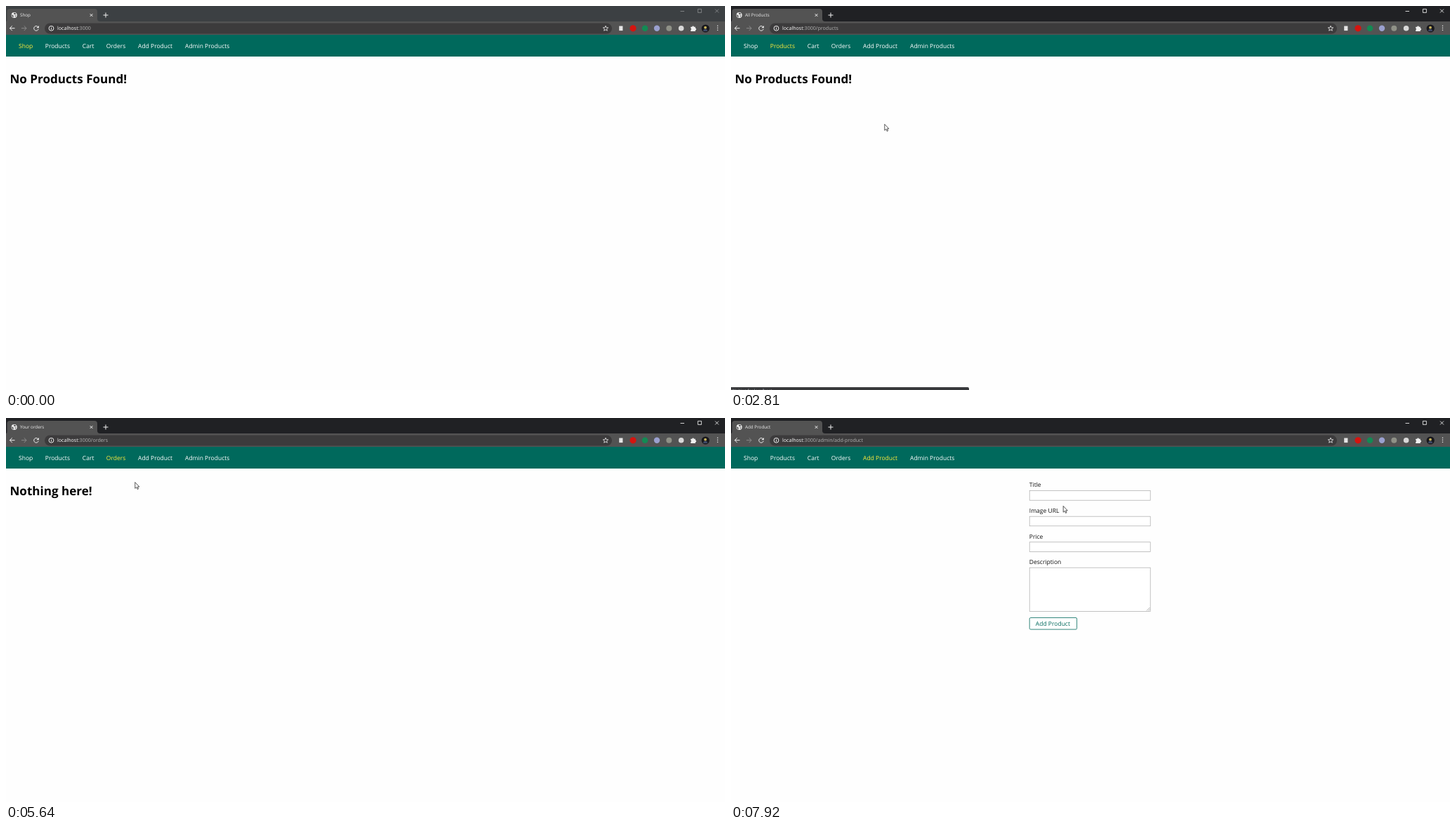
These frames come from a looping animation (1024x547 px, 8000 ms). An HTML page:

```html
<!DOCTYPE html>
<html lang="en">
<head>
<meta charset="utf-8">
<title>Shop</title>
<style>
  html, body { margin: 0; width: 100%; height: 100%; overflow: hidden; background: #fefefe; }
  svg { display: block; width: 100vw; height: 100vh; }
  text { font: 8.53px "Open Sans", sans-serif; text-rendering: geometricPrecision; white-space: pre; }
  .small { font-size: 6.3px; fill: #eee; }
  .url { font-size: 7.1px; fill: #b4b4b4; }
  .status { font-size: 6px; fill: #bdc1c6; }
  h1, .heading { font-size: 17.07px; font-weight: 700; }
  .line { fill: none; stroke: #f1f1f1; stroke-width: 1; }
  .field { fill: #fff; stroke: #a9a9a9; stroke-width: .7; }
</style>
</head>
<body>
<svg viewBox="0 0 1024 547" preserveAspectRatio="none">
  <rect width="1024" height="547" fill="#fefefe"/>

  <!-- Window frame and tab -->
  <rect id="titlebar" width="1024" height="23"/>
  <path d="M0 22 Q1.5 22 1.5 19 V8 Q1.5 4 5.5 4 H126 Q130 4 130 8 V18 Q130 22 134 22 H1024 V41 H0Z" fill="#535353"/>
  <g id="globe">
    <circle cx="11.7" cy="13" r="4" fill="#f1f1f1"/>
    <path d="M8.4 12 L10.6 13.4 V16.4 Q8 15.5 8.4 12 M11.2 9.6 L14.5 10.8 L13.5 12.2 L11 11.6Z M12.4 13.4 L14.6 13.6 L13.2 15.8Z" fill="#535353"/>
  </g>
  <path id="spinner" class="line" d="M8.2 13 A3.5 3.5 0 0 1 11.7 9.5"/>
  <text id="tabTitle" class="small" x="20" y="15.2"/>
  <path class="line" d="M119.7 11.2 l3.7 3.7 m0 -3.7 l-3.7 3.7"/>
  <path class="line" d="M138.5 13 h7 m-3.5 -3.5 v7"/>
  <path id="controls" fill="none" stroke-width=".8" d="M960.5 7.5 h5.5 M985.4 4.4 h5 v5 h-5Z M1010 4.5 l5 5 m0 -5 l-5 5"/>

  <!-- Toolbar -->
  <path class="line" d="M12.5 31.7 H5.5 M8.8 28.3 L5.4 31.7 L8.8 35.1"/>
  <path class="line" style="stroke:#8b8b8b" d="M22 31.7 h7 M25.7 28.3 L29.1 31.7 L25.7 35.1"/>
  <g id="reload">
    <path class="line" d="M45.7 29.9 A3.3 3.3 0 1 0 46.2 32.8"/>
    <path d="M46.8 28 V31.3 H43.4Z" fill="#f1f1f1"/>
  </g>
  <path id="stop" class="line" d="M40.2 29 l5.6 5.6 m0 -5.6 l-5.6 5.6"/>
  <rect x="55" y="24.5" width="808" height="15" rx="7.5" fill="#3c3b3c"/>
  <circle class="line" cx="64.5" cy="31.8" r="3.4" stroke-width=".8"/>
  <path class="line" d="M64.5 31.2 v2.4 M64.5 29.6 v.8"/>
  <text class="url" x="73" y="34.2"><tspan fill="#fff">localhost</tspan>:3000<tspan id="path"></tspan></text>
  <path class="line" stroke-width=".8" style="stroke-width:.8" d="M854 28.2 l1 2.5 2.7 .2 -2.1 1.7 .7 2.6 -2.3 -1.4 -2.3 1.4 .7 -2.6 -2.1 -1.7 2.7 -.2Z"/>
  <g id="extensions"></g>
  <path d="M975.2 29.8 h2 a1.3 1.3 0 0 1 2.6 0 h2 v2 a1.3 1.3 0 0 1 0 2.6 v1.6 h-6.6 v-2 a1.2 1.2 0 0 0 0 -2.3Z" fill="#f1f1f1"/>
  <circle cx="996.2" cy="32" r="5.6" fill="#17171c"/>
  <path d="M993 36 Q993 32.8 996 32.8 T999 36Z" fill="#3d4967"/>
  <circle cx="996" cy="30.7" r="1.9" fill="#c8b45c"/>
  <path d="M1013.5 28.2 v7.5" stroke="#f1f1f1" stroke-width="1.5" stroke-linecap="round" stroke-dasharray="0 3"/>

  <!-- Page -->
  <rect y="41" width="1024" height="31" fill="#00695c"/>
  <g id="nav"></g>
  <text id="heading" class="heading" x="5.5" y="110"/>
  <g id="form" fill="#111">
    <text x="424.8" y="98.2">Title</text>
    <text x="424.8" y="135">Image URL</text>
    <text x="424.8" y="171.5">Price</text>
    <text x="424.8" y="208.2">Description</text>
    <rect class="field" x="425.2" y="103.6" width="172" height="13.6"/>
    <rect class="field" x="425.2" y="140.2" width="172" height="13.6"/>
    <rect class="field" x="425.2" y="176.8" width="172" height="13.6"/>
    <rect class="field" x="425.2" y="213.2" width="172" height="62.2"/>
    <path d="M592 274.5 l4.5 -4.5 M594.6 274.5 l2 -2" stroke="#777" stroke-width=".6"/>
    <rect x="425.2" y="284.5" width="67.4" height="16.6" rx="1.6" fill="#fff" stroke="#00695c" stroke-width=".8"/>
    <text x="433.8" y="296" fill="#00695c">Add Product</text>
  </g>

  <g id="status">
    <rect id="statusBox" x="-4" y="543" height="20" rx="2" fill="#202124"/>
    <text id="statusText" class="status" x="1" y="549.8"/>
  </g>
  <g id="cursor" fill="#fff" stroke="#111" stroke-width=".7" stroke-linejoin="round">
    <path id="arrow" d="M.4 .4 V9.2 L2.4 7.4 L3.8 10.4 L5.2 9.8 L3.9 6.9 H6.5Z"/>
    <path id="hand" d="M-1 1 Q0 -.4 1 1 V4 Q2 3.2 2.7 4.3 Q3.7 3.8 4.2 4.8 Q5.4 4.5 5.4 6 V8 L4.4 11 H-.8 L-3.6 7.2 Q-3.6 5.6 -2 6.3 L-1 7.2Z"/>
  </g>
</svg>
<script>
const LOOP = 8000;
const $ = id => document.getElementById(id);
const make = (parent, tag, attrs) => {
  const node = document.createElementNS('http://www.w3.org/2000/svg', tag);
  for (const name in attrs) node.setAttribute(name, attrs[name]);
  return parent.appendChild(node);
};
const show = (id, on) => { $(id).style.display = on ? '' : 'none'; };
const latest = (list, t) => list.filter(item => item[0] <= t).pop();

make($('extensions'), 'rect', { x: 873.2, y: 28.5, width: 5.2, height: 6.6, fill: '#e4e4e4' });
[[893, 4.6, '#d5140f'], [910, 4.3, '#138a54'], [927, 4.2, '#9aa0cf'], [944.3, 4, '#8f9187'], [961.6, 3.8, '#d8d8d8']]
  .forEach(([cx, r, fill]) => make($('extensions'), 'circle', { cx, cy: 31.8, r, fill }));

const links = [['Shop', 18, 39], ['Products', 55.8, 92], ['Cart', 108.8, 126], ['Orders', 142.8, 171],
  ['Add Product', 188, 238], ['Admin Products', 255, 320]].map(([label, left, right]) => {
  const node = make($('nav'), 'text', { x: left, y: 60 });
  node.textContent = label;
  return { node, left, right };
});

// start, tab title, path, active link, heading (empty shows the form)
const pages = [
  [0, 'Shop', '', 0, 'No Products Found!'],
  [2330, 'All Products', '/products', 1, 'No Products Found!'],
  [3800, 'Your Cart', '/cart', 2, 'No Products in Cart!'],
  [5330, 'Your orders', '/orders', 3, 'Nothing here!'],
  [7250, 'Add Product', '/admin/add-product', 4, '']
];
const loads = [[2080, 2330], [3600, 3800], [4900, 5330], [6820, 7250]];

// start, end, width, text
const host = 'localhost:3000';
const waiting = 'Waiting for localhost...';
const statuses = [
  [1960, 2500, 71, host + '/products'], [2500, 2890, 339, waiting],
  [3420, 4080, 57, host + '/cart'],
  [4800, 5220, 64.5, host + '/orders'], [5220, 5520, 339, waiting],
  [6820, 7180, 101, host + '/admin/add-product'], [7180, 7480, 339, waiting]
];

// time, x, y
const moves = [
  [70, 938, 531], [820, 25, 59], [940, 25, 59], [1240, 214.3, 168], [1640, 214.3, 168],
  [1980, 76, 59], [2170, 76, 59], [2580, 218.4, 168], [2810, 218.4, 168],
  [3400, 117, 58], [3620, 117, 58], [3990, 168.4, 185], [4200, 178, 190], [4460, 178, 190],
  [4830, 158.7, 60.5], [5300, 158.7, 60.5], [6100, 222, 139], [6260, 227.6, 106],
  [6600, 213, 60], [7000, 213, 60], [7600, 282, 214], [7920, 472.8, 125], [LOOP, 472.8, 125]
];

function cursorAt(t) {
  const next = Math.max(1, moves.findIndex(m => m[0] > t));
  const [t0, x0, y0] = moves[next - 1], [t1, x1, y1] = moves[next];
  const p = Math.max(0, (t - t0) / (t1 - t0));
  const eased = p * p * (3 - 2 * p);
  return [x0 + (x1 - x0) * eased, y0 + (y1 - y0) * eased];
}

function draw(t) {
  const [, title, path, active, heading] = latest(pages, t);
  const loading = loads.some(([from, to]) => t >= from && t < to);
  const focused = t >= 1340;
  $('titlebar').setAttribute('fill', focused ? '#202124' : '#3c4043');
  $('controls').setAttribute('stroke', focused ? '#fff' : '#909294');
  $('tabTitle').textContent = title;
  $('path').textContent = path;
  $('heading').textContent = heading;
  show('form', !heading);
  show('globe', !loading);
  show('reload', !loading);
  show('spinner', loading);
  show('stop', loading);
  $('spinner').setAttribute('transform', `rotate(${40 - (t - 5010) * .36} 11.7 13)`);

  const [x, y] = cursorAt(t);
  const hovered = links.findIndex(l => x > l.left - 2 && x < l.right + 2 && y > 46 && y < 66);
  links.forEach((link, i) => link.node.setAttribute('fill', i === active || i === hovered ? '#ffeb3b' : '#fff'));
  show('cursor', t >= 70);
  show('arrow', hovered < 0);
  show('hand', hovered >= 0);
  $('cursor').setAttribute('transform', `translate(${x} ${y})`);

  const status = statuses.find(([from, to]) => t >= from && t < to);
  show('status', status);
  if (status) {
    const [, end, width, text] = status;
    $('statusBox').setAttribute('width', width + 4);
    $('statusText').textContent = text;
    const fades = !statuses.some(s => s[0] === end);
    $('status').style.opacity = fades ? Math.min(1, (end - t) / 80 * .8 + .1) : 1;
  }
}

function tick(now) {
  draw(now % LOOP);
  requestAnimationFrame(tick);
}
draw(0);
requestAnimationFrame(tick);
</script>
</body>
</html>
```
